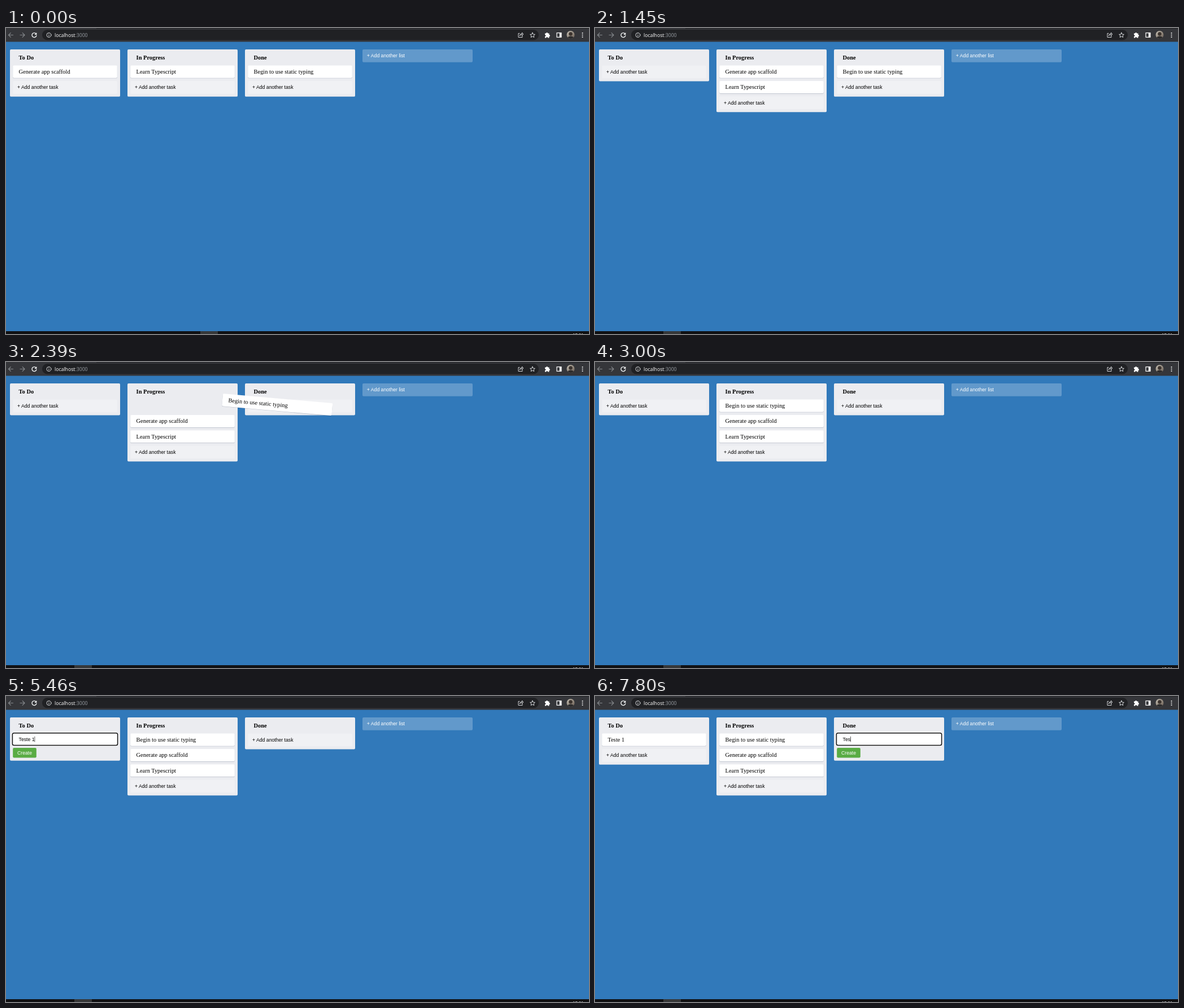
Recreate the animation shown at these times as an HTML page. Size 1032 px wide and 543 px high, loop 8 s.

```html
<!DOCTYPE html>
<html lang="en">
<head>
<meta charset="utf-8">
<title>Task board</title>
<style>
  html, body { margin: 0; width: 100%; height: 100%; overflow: hidden; }
  .stage { position: relative; width: 1032px; height: 543px; overflow: hidden; background: #3179ba; }
  .browser { position: absolute; left: 0; top: 0; }
  .url { font: 8.7px "Open Sans", "Noto Sans", sans-serif; fill: #fff; }
  .url .port { fill: #9aa0a6; }

  .taskbar { position: absolute; left: 0; top: 538px; width: 1032px; height: 5px; overflow: hidden; background: #101113; }
  .app { position: absolute; top: 0; width: 31px; height: 5px; background: #36383a; }
  .clock { position: absolute; left: 1003px; top: 2px; font: 7.6px/9px "Open Sans", sans-serif; color: #fff; }

  /* The page is shown at 65 % zoom. */
  .board { position: absolute; left: -6px; top: 25px; width: 1600px; height: 788px; transform: scale(.65); transform-origin: 0 0; font: 16px/18px "Liberation Serif", "Times New Roman", serif; color: #000; }
  .board div { box-sizing: border-box; white-space: pre; }
  .column { position: absolute; top: 20px; width: 300px; padding: 8px; border-radius: 3px; background: #ebecf0; }
  .title { height: 36px; padding: 6px 16px 12px; font-weight: bold; }
  .card { height: 34px; margin-bottom: 8px; padding: 8px 16px; border-radius: 3px; background: #fff; box-shadow: 0 1px 0 #091e4240; }
  .hidden { opacity: 0; }
  .preview { position: absolute; width: 300px; margin: 0; transform: rotate(5deg); }
  .add, .input, .create { font: 13.333px/15px "Liberation Sans", Arial, sans-serif; border-radius: 3px; }
  .add { height: 35px; padding: 10px 12px; background: #ffffff3d; }
  .add.list { position: absolute; left: 980px; top: 20px; width: 300px; color: #fff; }
  .input { height: 31px; margin-bottom: 8px; padding: 8px 16px; background: #fff; box-shadow: 0 0 0 2.4px #101010, 0 0 0 3.4px #fff; }
  .caret { display: inline-block; width: 1.5px; height: 15px; margin-right: -1.5px; vertical-align: top; background: #000; }
  .create { width: 64px; height: 27px; padding: 6px 0; text-align: center; color: #fff; background: #5aac44; }
</style>
</head>
<body>
<div class="stage">
  <svg class="browser" width="1032" height="25" fill="none" stroke-linecap="round" stroke-linejoin="round">
    <defs>
      <linearGradient id="photo" x2="1" y2="1">
        <stop stop-color="#c9c4b8"/><stop offset="1" stop-color="#66594e"/>
      </linearGradient>
      <clipPath id="round"><circle cx="999.5" cy="12" r="7"/></clipPath>
    </defs>
    <path fill="#35363a" d="M0 0h1032v24.5H0z"/>
    <path fill="#202124" d="M160 0h872v1H160z"/>
    <rect x="64" y="3" width="879" height="18.5" rx="9.25" fill="#202124"/>
    <g stroke="#85888c" stroke-width="1.2">
      <path d="M12.5 12.5h-8m3.8-3.8-3.8 3.8 3.8 3.8"/>
      <path d="M25 12.5h8m-3.8-3.8 3.8 3.8-3.8 3.8"/>
    </g>
    <path stroke="#f1f3f4" stroke-width="1.4" d="M53.2 10.2a4 4 0 1 0 .7 3.2"/>
    <path fill="#f1f3f4" d="M54.4 8v4h-4z"/>
    <g stroke="#d5d7da">
      <circle cx="76" cy="12.5" r="4"/>
      <path d="M76 12.3v2.2M76 10.4v.1"/>
      <path d="M909 9.5h-2v7h7v-2M909.5 13.5c.3-2.4 1.7-3.4 4-3.4V8.2l2.3 2.8-2.3 2.6v-1.9c-1.8 0-3 .5-4 1.8z"/>
      <path d="m932 8.2 1.3 2.9 3.1.3-2.4 2.1.8 3.1-2.8-1.6-2.8 1.6.8-3.1-2.4-2.1 3.1-.3z"/>
    </g>
    <path fill="#fff" d="M954 9.5h2.1a1.5 1.5 0 0 1 3 0h2.4v2.4a1.5 1.5 0 0 1 0 3v2.6h-2.3a1.5 1.5 0 0 0-3 0H954v-2.4a1.5 1.5 0 0 0 0-3z"/>
    <path stroke="#fff" stroke-width="1.2" d="M975 8.7h8v7.6h-8z"/>
    <path fill="#fff" d="M979.8 8.7h3.2v7.6h-3.2z"/>
    <g clip-path="url(#round)">
      <path fill="url(#photo)" d="M992 4h15v16h-15z"/>
      <circle cx="999.5" cy="10.5" r="3.2" fill="#3b332e"/>
      <ellipse cx="999.5" cy="19" rx="6" ry="4.5" fill="#2c2b2c"/>
    </g>
    <g fill="#fff">
      <circle cx="1020.5" cy="9" r="1"/><circle cx="1020.5" cy="12.5" r="1"/><circle cx="1020.5" cy="16" r="1"/>
    </g>
    <text class="url" x="86" y="15.6">localhost<tspan class="port">:3000</tspan></text>
  </svg>

  <div class="board"></div>

  <div class="taskbar">
    <div class="app" id="oldApp" style="left:344px"></div>
    <div class="app" id="newApp" style="left:121px"></div>
    <div class="clock">17:21</div>
  </div>
</div>

<script>
const LOOP = 8000, BLINK = 530;
const SCAFFOLD = 'Generate app scaffold';
const LEARN = 'Learn Typescript';
const TYPING = 'Begin to use static typing';
const TITLES = ['To Do', 'In Progress', 'Done'];

// Each path point is the preview's place on the board, held for one tick.
const DRAGS = [
  { card: SCAFFOLD, from: 0, to: 1, start: 840, end: 1450, tick: 80, enter: 4,
    path: [[28, 64], [60, 63], [120, 61], [190, 61], [250, 62], [290, 63], [310, 63]] },
  { card: TYPING, from: 2, to: 1, start: 2250, end: 2800, tick: 70, enter: 2,
    path: [[668, 64], [642, 63], [598, 61], [545, 60], [505, 59.5], [478, 60], [466, 61]] }
];

const FORMS = [
  { column: 0, open: 3600, close: 5860, text: 'Teste 1', keys: [4330, 4460, 4660, 4860, 4930, 5260, 5460] },
  { column: 2, open: 6940, close: LOOP, text: 'Tes', keys: [7470, 7600, 7800] }
];

const board = document.querySelector('.board');
const oldApp = document.getElementById('oldApp');
const newApp = document.getElementById('newApp');

const div = (cls, text, style = '') => `<div class="${cls}" style="${style}">${text}</div>`;

function formHtml(form, t) {
  const typed = form.keys.filter(k => k <= t);
  const last = typed.length ? typed[typed.length - 1] : form.open;
  const caretOn = Math.floor((t - last) / BLINK) % 2 === 0;
  const caret = caretOn ? '<span class="caret"></span>' : '';
  return div('input', form.text.slice(0, typed.length) + caret) + div('create', 'Create');
}

function boardHtml(t) {
  const lists = [[SCAFFOLD], [LEARN], [TYPING]];
  let held = '', preview = '';

  for (const d of DRAGS) {
    if (t < d.start) continue;
    const step = Math.min(Math.floor((t - d.start) / d.tick), d.path.length - 1);
    if (step >= d.enter) {
      lists[d.from].shift();
      lists[d.to].unshift(d.card);
    }
    if (t < d.end) {
      const [x, y] = d.path[step];
      held = d.card;
      preview = div('card preview', d.card, `left:${x}px;top:${y}px`);
    }
  }
  if (t >= FORMS[0].close) lists[0].push(FORMS[0].text);

  const columns = lists.map((cards, i) => {
    const form = FORMS.find(f => f.column === i && t >= f.open && t < f.close);
    const body = div('title', TITLES[i])
      + cards.map(c => div(c === held ? 'card hidden' : 'card', c)).join('')
      + (form ? formHtml(form, t) : div('add', '+ Add another task'));
    return div('column', body, `left:${20 + 320 * i}px`);
  });
  return columns.join('') + div('add list', '+ Add another list') + preview;
}

let shown = '';
function draw(now) {
  const t = now % LOOP;
  const html = boardHtml(t);
  if (html !== shown) board.innerHTML = shown = html;

  const swap = [500, 570, 640].filter(s => s <= t).length / 3;
  oldApp.style.opacity = 1 - swap;
  newApp.style.opacity = swap;
}

const begin = performance.now();
function loop() {
  draw(performance.now() - begin);
  requestAnimationFrame(loop);
}
loop();
</script>
</body>
</html>
```
